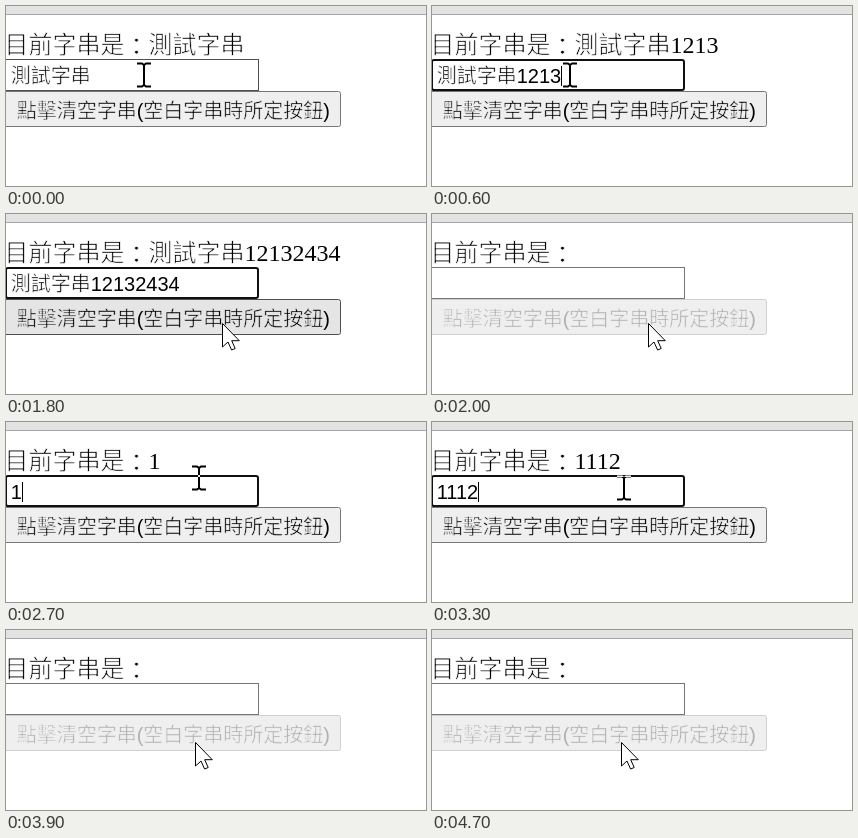
An HTML page for the animation above (4.8 s loop, 420x180 px).

```html
<!DOCTYPE html>
<html lang="zh-Hant">
<head>
<meta charset="utf-8">
<style>
  html, body { margin: 0; width: 100%; height: 100%; overflow: hidden; background: #fff; }
  svg { display: block; width: 420px; height: 180px; }
  text { font-weight: 300; white-space: pre; stroke-width: 0; stroke-linejoin: round; }
  .serif { font-family: "Liberation Serif", "Noto Sans CJK TC", "Noto Sans CJK", serif; font-size: 24px; }
  .sans { font-family: "Liberation Sans", "Noto Sans CJK TC", "Noto Sans CJK", sans-serif; font-size: 20px; }
  /* a thin edge in the background colour lightens the strokes */
  .serif .thin { stroke-width: .75px; }
  .sans .thin { stroke-width: .6px; }
  #beam { mix-blend-mode: difference; }
</style>
</head>
<body>
<svg viewBox="0 0 420 180">
  <rect width="420" height="180" fill="#fff"/>
  <rect width="420" height="8" fill="#e3e3e3"/>
  <rect y="8" width="420" height="1" fill="#a6a6a6"/>
  <g class="serif" stroke="#fff">
    <text x="-1.5" y="46.5" class="thin"><tspan class="thin">目前字串是</tspan></text>
    <text x="118.5" y="48.5"><tspan class="thin">：</tspan></text>
    <text x="142.5" y="46.5"><tspan id="labelBase" class="thin"></tspan><tspan id="labelKeys"></tspan></text>
  </g>
  <rect id="box" fill="#fff"/>
  <text id="value" class="sans" x="4.7" y="77" stroke="#fff"><tspan id="valueBase" class="thin"></tspan><tspan id="valueKeys"></tspan></text>
  <rect id="caret" y="60" width="1" height="20"/>
  <rect id="button" x="-2.5" y="85.5" width="337" height="35" rx="2"/>
  <text id="caption" class="sans" x="10.7" y="111.5"><tspan class="thin">點擊清空字串</tspan>(<tspan class="thin">空白字串時所定按鈕</tspan>)</text>
  <path id="beam" fill="none" stroke="#fff" stroke-width="2"
    d="M-7-11.5H-2L0-10L2-11.5H7M0-10V10M-7 11.5H-2L0 10L2 11.5H7"/>
  <path id="arrow" fill="#fff" stroke="#000" stroke-linejoin="miter"
    d="M.5.5V24L6 19L9.6 27L13.2 25.5L9.7 17.7H17.3Z"/>
</svg>
<script>
const LOOP = 4800, STEP = 100;
const $ = id => document.getElementById(id);
const set = (id, attrs) => {
  for (const k in attrs) $(id).setAttribute(k, attrs[k]);
};
const show = (id, on) => set(id, { visibility: on ? 'visible' : 'hidden' });

// pointer stops: time, x, y
const track = [
  [0, 138, 69], [900, 138, 69], [1200, 168, 79], [1700, 216, 109],
  [2100, 216, 109], [2500, 193, 64], [2700, 193, 56], [3200, 193, 56],
  [3500, 190, 87], [3800, 189, 112], [LOOP, 189, 112]
];
// each session: focus, press and clear times, starting text, typed keys and their times
const sessions = [
  { focus: 200, press: 1900, clear: 2000, base: '測試字串', keys: '12132434',
    times: [300, 400, 500, 600, 700, 800, 1000, 1100] },
  { focus: 2500, press: 3500, clear: 3600, base: '', keys: '1112',
    times: [2600, 2800, 3000, 3100] }
];
const looks = {
  idle: ['#efefef', '#767676', '#000'],
  hover: ['#e5e5e5', '#4f4f4f', '#000'],
  press: ['#f5f5f5', '#8d8d8d', '#000'],
  off: ['#efefef', '#d0d0d0', '#b0b0b0']
};

function pointer(t) {
  const i = track.findIndex(p => p[0] > t);
  const [t0, x0, y0] = track[i - 1], [t1, x1, y1] = track[i];
  const k = (t - t0) / (t1 - t0);
  return [x0 + (x1 - x0) * k, y0 + (y1 - y0) * k];
}

function drawText(base, keys) {
  for (const id of ['label', 'value']) {
    $(id + 'Base').textContent = base;
    $(id + 'Keys').textContent = keys;
  }
}

function drawBox(focused, over) {
  set('box', focused
    ? { x: 0, y: 54, width: 252, height: 30, rx: 2, stroke: '#101010', 'stroke-width': 2 }
    : { x: -2.5, y: 53.5, width: 255, height: 31, rx: 0, stroke: over ? '#4f4f4f' : '#767676', 'stroke-width': 1 });
}

function draw(ms) {
  const t = Math.floor(ms % LOOP / STEP) * STEP;
  const s = sessions[t < 2200 ? 0 : 1];
  const [x, y] = pointer(t);
  const count = s.times.filter(k => k <= t).length;
  const cleared = t >= s.clear;
  const base = cleared ? '' : s.base;
  const keys = cleared ? '' : s.keys.slice(0, count);
  const focused = t >= s.focus && t < s.press;

  drawText(base, keys);
  drawBox(focused, y > 53 && y < 85.5);

  const last = count ? s.times[count - 1] : s.focus;
  show('caret', focused && (t - last) % 1000 < 500);
  set('caret', { x: Math.round(4.7 + $('value').getComputedTextLength()) });

  const over = y > 85.5 && y < 121;
  const look = !(base + keys) ? 'off' : t >= s.press ? 'press' : over ? 'hover' : 'idle';
  const [fill, stroke, ink] = looks[look];
  set('button', { fill, stroke });
  set('caption', { fill: ink, stroke: fill });

  const at = `translate(${Math.round(x)} ${Math.round(y)})`;
  set('beam', { transform: at });
  set('arrow', { transform: at });
  show('beam', y < 85.5);
  show('arrow', y >= 85.5);
}

const start = performance.now();
function tick() {
  draw(performance.now() - start);
  requestAnimationFrame(tick);
}
tick();
</script>
</body>
</html>
```
